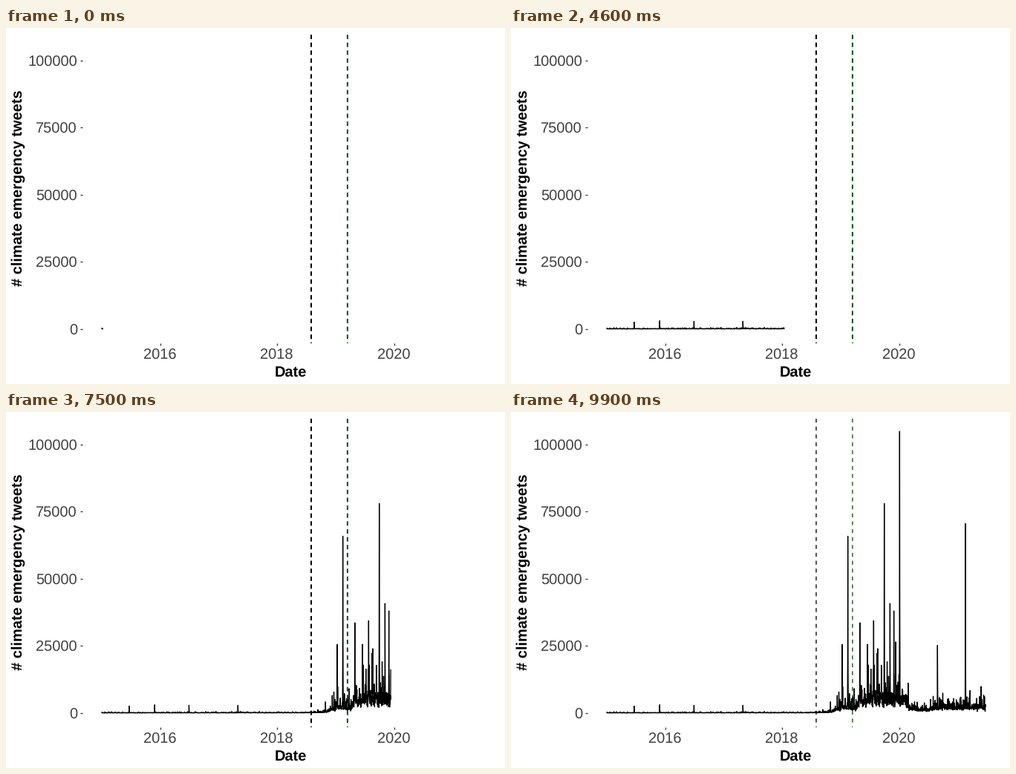
Write a matplotlib script that moves like this. It is 672 px wide and 480 px high and loops after 10000 ms.

```python
import numpy as np
import matplotlib.pyplot as plt
from matplotlib.animation import FuncAnimation

W, H, DPI = 672, 480, 96
FRAMES, STEP_MS = 100, 100
PX = 72 / DPI                       # points per pixel

X0, X1 = 128.7, 639.6               # first and last day
YEAR = 78.8                         # pixels per year
DAYS = 2366
Y0, PER_K = 406.0, 3.625            # zero line, pixels per 1000 tweets
TOP, BOTTOM, LEFT = 9.0, 425.0, 103.2
STROKE = 1.33                       # line width in pixels
PERIOD = 10.64                      # dash plus gap

plt.rcParams.update({
    "font.family": "Liberation Sans",
    "text.hinting": "none",
    "lines.scale_dashes": False,
    "path.simplify": False,
})

# Usual daily level in thousands, and the outstanding days: (x, thousands)
LEVEL = [(128, .12), (408, .15), (432, .5), (445, 2.2), (465, 2), (472, 4.8),
         (526, 5.2), (538, 1.5), (560, 1.1), (578, 2.2), (640, 2.2)]
PEAKS = [(165.8, 2.6), (200.3, 3.1), (246.5, 2.9), (312.3, 2.9), (430.2, 4.2),
         (446, 25.5), (453.5, 65.8), (469.8, 33.6), (480.2, 25.6),
         (488.3, 34.4), (493.8, 24), (502.6, 78), (510.4, 40.8), (515.6, 38),
         (518.3, 26.5), (523.4, 104.8), (574.4, 25.2), (612, 70.5)]


def daily_counts():
    """Noisy level with a burst about every two weeks, plus the peaks."""
    rng = np.random.default_rng(7)
    x = np.linspace(X0, X1, DAYS)
    level = np.interp(x, *zip(*LEVEL))
    k = level * np.exp(rng.normal(0, .36, DAYS))

    def spike(day, height):
        for shift, share in ((-1, .3), (0, 1), (1, .4), (2, .18)):
            k[day + shift] = max(k[day + shift], height * share)

    for day in np.arange(8, DAYS - 8, 13) + rng.integers(-5, 6, 181):
        spike(day, level[day] * min(4.5, rng.lognormal(.8, .5)))
    for px, height in PEAKS:
        spike(np.argmin(abs(x - px)), height)
    return x, Y0 - PER_K * k


def draw_axes(ax):
    tick = dict(color="#333333", lw=STROKE * PX, solid_capstyle="butt")
    text = dict(color="#404040", fontsize=20 * PX, va="baseline")
    title = dict(color="black", fontsize=20 * PX, weight="bold",
                 ha="center", va="baseline")
    for n in range(0, 125, 25):
        y = Y0 - PER_K * n
        ax.plot([LEFT - 3.4, LEFT], [y, y], **tick)
        ax.text(96, y + 7.8, str(n * 1000), ha="right", **text)
    for year in (2016, 2018, 2020):
        x = X0 + YEAR * (year - 2015)
        ax.plot([x, x], [BOTTOM, BOTTOM + 3.4], **tick)
        ax.text(x - .4, 446.3, str(year), ha="center", **text)
    ax.text(383.4, 469.3, "Date", **title)
    ax.text(21.8, 216, "# climate emergency tweets", rotation=90,
            rotation_mode="anchor", **title)


def marker(ax, color):
    return ax.plot([0, 0], [TOP, BOTTOM], color=color, zorder=4, snap=False,
                   dash_capstyle="butt")[0]


def set_dash(line, x, width, dash):
    line.set_xdata([x, x])
    line.set_linewidth(width * PX)
    line.set_linestyle((0, (dash * PX, (PERIOD - dash) * PX)))


fig = plt.figure(figsize=(W / DPI, H / DPI), dpi=DPI, facecolor="white")
ax = fig.add_axes([0, 0, 1, 1])
ax.set(xlim=(0, W), ylim=(H, 0))
ax.axis("off")
draw_axes(ax)

xs, ys = daily_counts()
curve, = ax.plot([], [], color="black", lw=STROKE * PX, zorder=3, snap=False,
                 solid_joinstyle="round", solid_capstyle="butt")
black = marker(ax, "black")
green = marker(ax, "#0a500a")


def update(i):
    head = min(X1, 130.7 + 5.165 * i)
    n = np.searchsorted(xs, head)
    curve.set_data(np.append(xs[:n], head),
                   np.append(ys[:n], np.interp(head, xs, ys)))
    # The markers turn finer once the whole curve is out
    width, dash = (STROKE, 5.32) if i == FRAMES - 1 else (2, 6)
    set_dash(black, 411, width, dash)
    set_dash(green, 459.9, width, dash)
    return curve, black, green


anim = FuncAnimation(fig, update, frames=FRAMES, interval=STEP_MS,
                     repeat=True, repeat_delay=0, blit=False)
plt.show()
```
